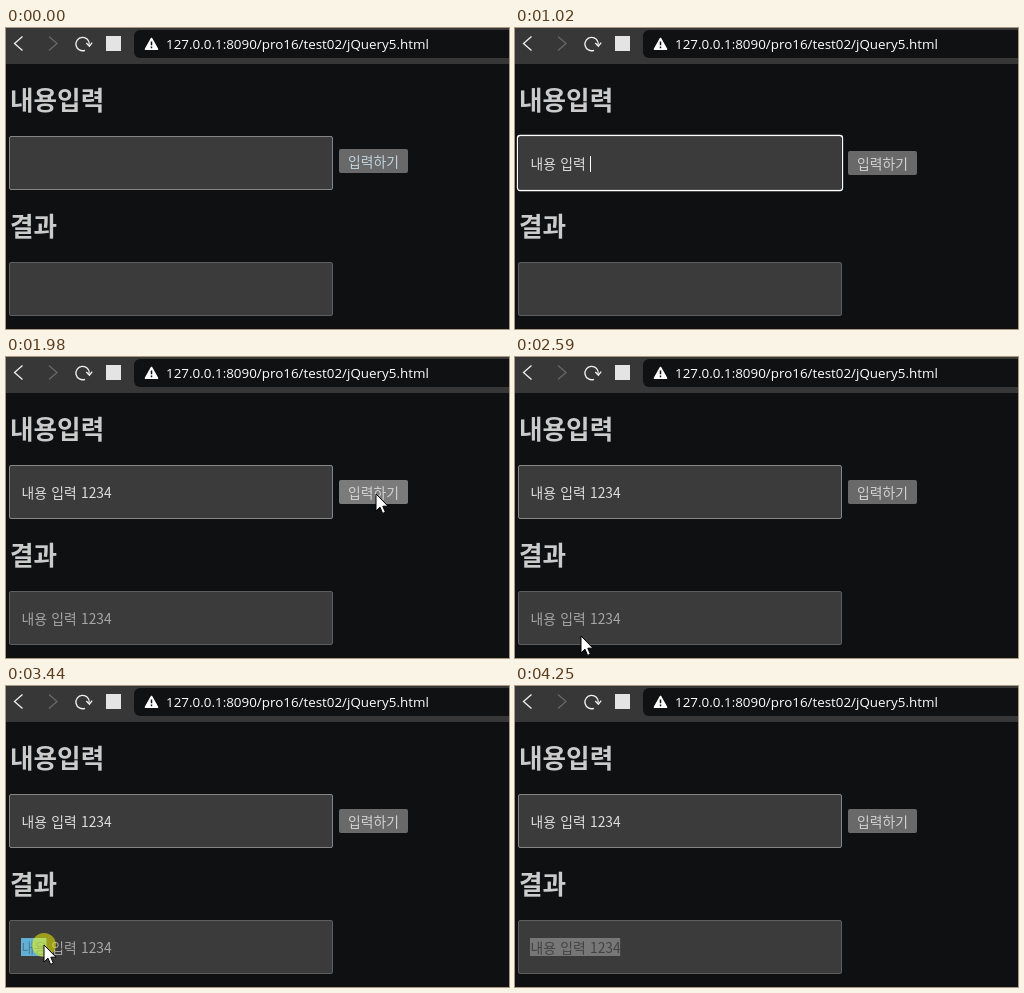
These frames come from a looping animation (503 px wide and 301 px high, 4380 ms). An HTML page:

```html
<!DOCTYPE html>
<html lang="ko">
<head>
<meta charset="utf-8">
<style>
html, body { margin: 0; width: 100%; height: 100%; overflow: hidden; background: #0f1011; }
svg { display: block; width: 503px; height: 301px; }
text { font: 13.8px "Noto Sans CJK KR", "Noto Sans CJK JP", sans-serif; white-space: pre; word-spacing: .5px; }
.url { font: 13.4px "Open Sans", "Noto Sans", sans-serif; fill: #fff; }
.head { font-size: 25.6px; font-weight: 700; fill: #cbcbcb; }
.icon { fill: none; stroke: #f0f0f0; stroke-width: 1.3; }
</style>
</head>
<body>
<svg viewBox="0 0 503 301">
  <rect width="503" height="301" fill="#0f1011"/>
  <rect width="503" height="36" fill="#373737"/>
  <path d="M503 2H134a6 6 0 0 0-6 6v16a6 6 0 0 0 6 6h369z" fill="#101112"/>
  <path class="icon" d="M16.5 8.5L8.5 15.5L16.5 22.5"/>
  <path class="icon" d="M43 8.5L51 15.5L43 22.5" style="stroke:#686868"/>
  <path class="icon" d="M79 22.3A6.7 6.7 0 1 1 83.3 16.5M80.3 15L83.4 18.2L86.2 14.7"/>
  <rect x="100" y="8" width="15" height="15" fill="#e4e4e4"/>
  <path d="M145.5 10.5L151.5 21.2H139.5Z" fill="#fff" stroke="#fff" stroke-width="1.6" stroke-linejoin="round"/>
  <path d="M145.5 13.5V17.3M145.5 18.6V20.2" stroke="#101112" stroke-width="1.5"/>
  <text class="url" x="160" y="21">127.0.0.1:8090/pro16/test02/jQuery5.html</text>

  <text class="head" x="4" y="82">내용입력</text>
  <rect x="3.5" y="108.5" width="323" height="53" rx="1.5" fill="#3b3b3b" stroke="#858585"/>
  <g id="ring" fill="none">
    <rect x="3.5" y="108.5" width="323" height="53" rx="1.5" stroke="#101010"/>
    <rect x="2.5" y="107.5" width="325" height="55" rx="2.5" stroke="#fff" stroke-width="1.3"/>
  </g>
  <text id="typed" x="15.5" y="141" fill="#dedede"></text>
  <path id="caret" stroke="#fff"/>
  <g id="button">
    <rect id="face" x="333" y="121" width="69" height="24" rx="2"/>
    <text id="label" x="367.5" y="138.5" text-anchor="middle">입력하기</text>
  </g>

  <text class="head" x="4" y="208">결과</text>
  <rect x="3.5" y="234.5" width="323" height="53" rx="1.5" fill="#3b3b3b" stroke="#5e5e5e"/>
  <rect id="mark" x="15" y="252" height="18"/>
  <text id="result" x="15.5" y="267" fill="#a6a6a6"><tspan id="picked"></tspan><tspan id="rest"></tspan></text>

  <g id="pointer">
    <circle id="press" r="12" fill="#ff0" fill-opacity=".5"/>
    <path id="arrow" d="M0 0V17L4 13.2L6.6 19.4L9.4 18.2L6.8 12.2H12Z" fill="#fff" stroke="#000"/>
    <path id="beam" d="M-1 -7.5H1.5M3.5 -7.5H6M2.5 -7V8M-1 8.5H1.5M3.5 8.5H6" fill="none" stroke="#c4c4b4"/>
  </g>
</svg>
<script>
const LOOP = 4380;
const STEP = 68;
const PHRASE = "내용 입력 1234";

const easeIn = u => u * u;
const easeOut = u => 1 - (1 - u) ** 2;
const linear = u => u;

// Pointer strokes: quadratic curves through start, bend and end points
const STROKES = [
  { at: 200, until: 500, ease: easeOut, points: [[300, 241], [270, 150], [242, 142]] },
  { at: 1230, until: 1720, ease: easeOut, points: [[320, 151], [363, 156], [370, 137]] },
  { at: 2180, until: 2588, ease: linear, points: [[352, 160], [110, 300], [66, 279]] },
  { at: 2660, until: 3230, ease: easeOut, points: [[66, 268], [40, 250], [17, 258]] },
  { at: 3300, until: 3720, ease: easeIn, points: [[15, 258], [124, 262], [214, 284]] }
];

const $ = id => document.getElementById(id);
const set = (id, attrs) => { for (const k in attrs) $(id).setAttribute(k, attrs[k]); };
const show = (id, on) => set(id, { visibility: on ? "inherit" : "hidden" });
const within = (t, a, b) => t >= a && t < b;
const ticks = (t, from) => Math.floor((t - from) / STEP);

function pointerAt(t) {
  const { at, until, ease, points: [a, b, c] } = STROKES.findLast(s => s.at <= t) || STROKES[0];
  const part = ticks(t, at) * STEP / (until - at);
  const u = ease(Math.max(0, Math.min(1, part)));
  return [0, 1].map(k =>
    Math.round((1 - u) ** 2 * a[k] + 2 * u * (1 - u) * b[k] + u * u * c[k]));
}

function drawInput(t) {
  const count = t < 740 ? 0 : 1 + Math.floor(ticks(t, 740) * 9 / 7);
  const text = PHRASE.slice(0, count);
  $("typed").textContent = text;
  const x = Math.round(15 + (text ? $("typed").getComputedTextLength() : 0)) + .5;
  set("caret", { d: text ? `M${x} 128V144` : `M${x} 126V142` });
  show("caret", within(t, 540, 1720));
  show("ring", within(t, 540, 1850));
}

function drawResult(t, x) {
  const text = t >= 1980 ? PHRASE : "";
  $("picked").textContent = "";
  $("rest").textContent = text;
  const edge = k => k ? $("result").getSubStringLength(0, k) : 0;
  let n = 0;
  if (t >= 3300) {
    while (n < text.length && (t >= 3720 || (edge(n) + edge(n + 1)) / 2 < x - 15)) n++;
  }
  const faded = t >= 4250;
  set("mark", { width: edge(n), fill: faded ? "#777" : "#62b0d5" });
  set("picked", { fill: faded ? "#434343" : "#4d7d94" });
  $("picked").textContent = text.slice(0, n);
  $("rest").textContent = text.slice(n);
}

function draw(t) {
  const [x, y] = pointerAt(t);
  const visible = within(t, 200, 740) || within(t, 1230, 3790);
  const overField = within(x, 3, 327) && within(y, 108, 162);
  const overButton = visible && within(x, 333, 402) && within(y, 123, 147);

  drawInput(t);
  drawResult(t, x);

  set("button", { transform: `translate(0 ${t < 740 ? 0 : 2})` });
  set("face", { fill: overButton ? "#7b7b7b" : "#696969" });
  set("label", { fill: t < 200 ? "#c0d4de" : "#d2d2d2" });

  set("pointer", { transform: `translate(${x} ${y})` });
  show("pointer", visible);
  show("arrow", !overField);
  show("beam", overField);
  show("press", within(t, 540, 610) || within(t, 1850, 1980) || within(t, 3300, 3720));
}

const begin = performance.now();
function tick() {
  draw((performance.now() - begin) % LOOP);
  requestAnimationFrame(tick);
}
tick();
</script>
</body>
</html>
```
